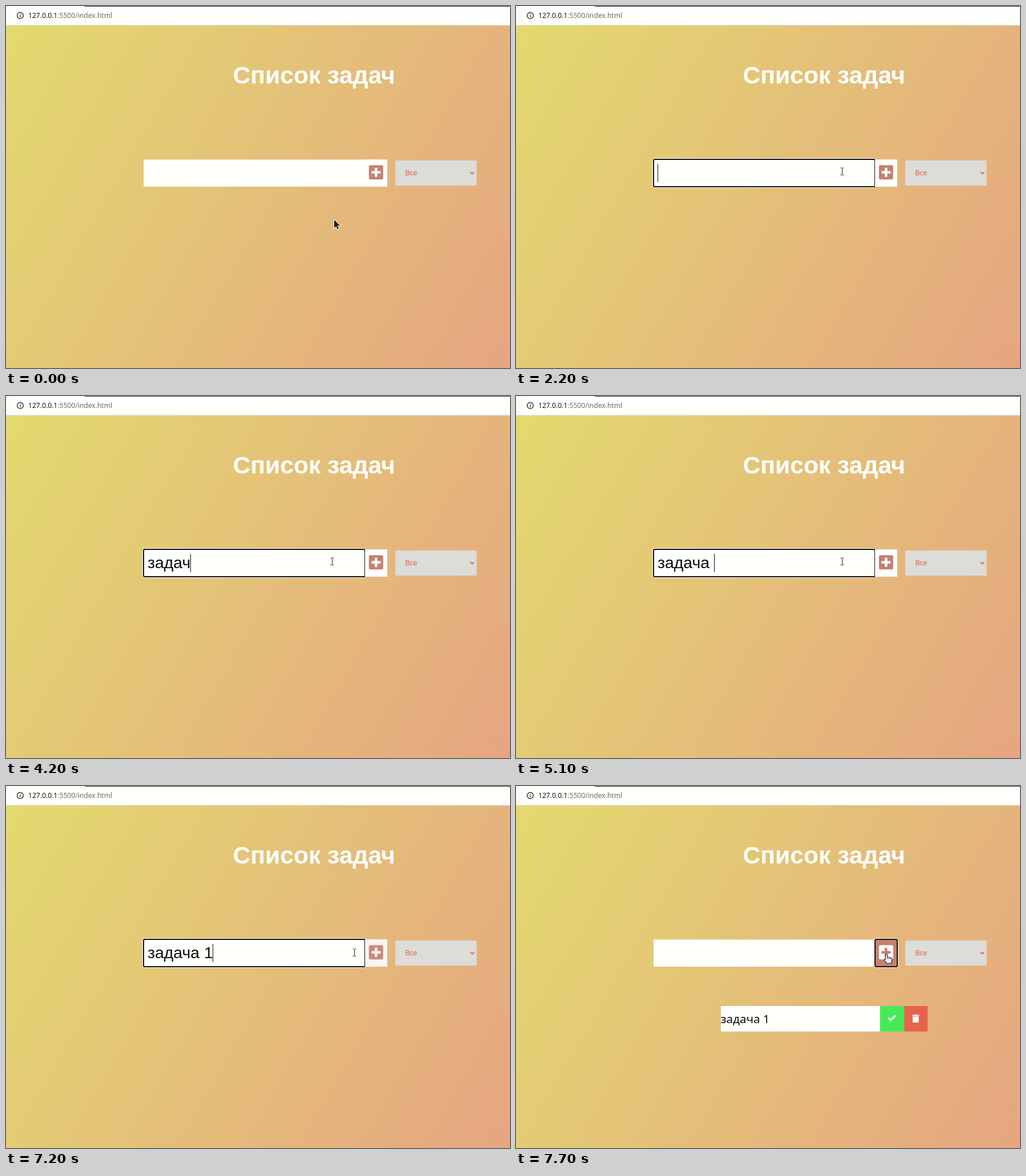
An HTML page with a canvas for the animation above (8 s loop, 883 by 635 pixels).

```html
<!DOCTYPE html>
<html lang="ru">
<head>
<meta charset="utf-8">
<title>Список задач</title>
<style>
  html, body { margin: 0; width: 100%; height: 100%; overflow: hidden; }
  canvas { display: block; }
</style>
</head>
<body>
<canvas id="stage" width="883" height="635"></canvas>
<script>
const ctx = document.getElementById('stage').getContext('2d');
const LOOP = 8000, STEP = 100;
const WHITE = '#fffffc', ROSE = [197, 128, 112], RED = '#e5644b', INK = '#0c0c0c';
const ARIAL = '"Liberation Sans", Arial, sans-serif';
const NOTO = '"Noto Sans", "Open Sans", sans-serif';
const TASK = 'задача 1';

// [time, letters typed]
const TYPING = [[3400, 1], [3500, 2], [3900, 4], [4200, 5], [5000, 6], [5100, 7], [6100, 8]];
const CARET_ON = [[1100, 1600], [2200, 3000], [3400, 4800], [5000, 5700], [6100, 6600], [7100, 7600]];
const FOCUS = 1100, PRESS = 7600, ADDED = 7700;

const clamp = v => Math.min(1, Math.max(0, v));
const smooth = v => { v = clamp(v); return v * v * (3 - 2 * v); };
const lerp = (a, b, u) => a + (b - a) * u;
const within = (t, [from, to]) => t >= from && t < to;
const blend = (a, b, u) => `rgb(${a.map((v, i) => Math.round(lerp(v, b[i], u))).join(',')})`;

function rect(x, y, w, h, color) {
  ctx.fillStyle = color;
  ctx.fillRect(x, y, w, h);
}

function round(x, y, w, h, r, color) {
  ctx.beginPath();
  ctx.roundRect(x, y, w, h, r);
  ctx.fillStyle = color;
  ctx.fill();
}

function line(points, color, width, closed) {
  ctx.beginPath();
  points.forEach(([x, y]) => ctx.lineTo(x, y));
  if (closed) ctx.closePath();
  ctx.strokeStyle = color;
  ctx.lineWidth = width;
  ctx.stroke();
}

function text(str, x, y, font, color) {
  ctx.font = font;
  ctx.fillStyle = color;
  ctx.fillText(str, x, y);
  return ctx.measureText(str).width;
}

function focusRing(x, y, w, h) {
  ctx.beginPath();
  ctx.roundRect(x - 1.5, y - 1.5, w + 3, h + 3, 4);
  ctx.strokeStyle = WHITE;
  ctx.lineWidth = 1;
  ctx.stroke();
  ctx.beginPath();
  ctx.roundRect(x, y, w, h, 2.5);
  ctx.strokeStyle = '#101010';
  ctx.lineWidth = 2;
  ctx.stroke();
}

function drawPage() {
  const gradient = ctx.createLinearGradient(0, 0, 937, 541);
  gradient.addColorStop(0, 'rgb(227,219,110)');
  gradient.addColorStop(0.5, 'rgb(228,191,121)');
  gradient.addColorStop(1, 'rgb(230,165,129)');
  rect(0, 0, 883, 635, gradient);

  rect(0, 0, 883, 34, '#fbfbf8');
  round(9, 4, 900, 26, 13, WHITE);
  rect(138, 0, 745, 1, '#2e2d2a');
  rect(0, 33.5, 883, 1, '#d8d5c8');

  ctx.beginPath();
  ctx.arc(25, 16.7, 5.4, 0, 7);
  ctx.strokeStyle = '#2f2f2f';
  ctx.lineWidth = 1.4;
  ctx.stroke();
  rect(24.3, 13.6, 1.4, 1.5, '#2f2f2f');
  rect(24.3, 16, 1.4, 3.6, '#2f2f2f');
  const url = `12.1px ${NOTO}`;
  const host = text('127.0.0.1', 39, 21, url, '#111');
  text(':5500/index.html', 39 + host, 21, url, '#6a6a68');

  ctx.textAlign = 'center';
  text('Список задач', 539.7, 135.5, `bold 42.6px ${ARIAL}`, WHITE);
  ctx.textAlign = 'left';

  rect(682, 271, 142.5, 44, '#dcdcd8');
  text('Все', 699.5, 297, `12px ${ARIAL}`, '#df604a');
  line([[813.5, 291], [817, 294.7], [820.5, 291]], '#df604a', 1.8);
}

function drawInput(t) {
  rect(241, 269.4, 427, 47.4, WHITE);
  if (within(t, [FOCUS, PRESS])) focusRing(241, 269, 388, 48);
  if (t >= ADDED) return;
  const typed = TYPING.filter(([time]) => t >= time).length;
  const value = typed ? TASK.slice(0, TYPING[typed - 1][1]) : '';
  const width = text(value, 248, 302, `28.4px ${ARIAL}`, INK);
  if (CARET_ON.some(span => within(t, span))) {
    rect(248 + Math.floor(width), 277, 1, 32, INK);
  }
}

function drawAddButton(t) {
  const hover = clamp((t - 7180) / 250);
  const light = [255, 255, 252];
  const back = blend(light, ROSE, hover), front = blend(ROSE, light, hover);
  rect(629, 269.4, 39, 47.4, back);
  if (t >= PRESS) focusRing(629, 269, 39, 48);
  round(635.8, 279.2, 25, 25, 2.7, front);
  round(640.3, 289.5, 16, 4.5, 0.7, back);
  round(646, 283.7, 4.5, 16, 0.7, back);
}

function drawTask() {
  rect(359, 386, 279, 44.6, WHITE);
  text(TASK, 358.5, 416, `20.5px ${NOTO}`, INK);
  rect(637.6, 386, 42.6, 44.6, '#48e959');
  line([[652.2, 406.8], [656.5, 411], [665, 402.6]], WHITE, 2.9);
  rect(680.2, 386, 41, 44.6, RED);
  rect(694, 401.6, 12.4, 1.8, WHITE);
  rect(698, 400.6, 4.4, 1.2, WHITE);
  round(694.9, 404.3, 10.6, 10.7, [0, 0, 1.4, 1.4], WHITE);
}

function drawArrow() {
  const shape = [[0, 0], [0, 14.5], [3.4, 11.3], [5.7, 16.6], [7.8, 15.7], [5.6, 10.6], [10, 10.2]];
  line(shape, '#f4f1e6', 2, true);
  ctx.fillStyle = '#1b1b1b';
  ctx.fill();
}

function drawBeam() {
  const ink = '#222';
  rect(0, -5.5, 1, 11.5, ink);
  for (const y of [-6.5, 6]) {
    rect(-2.5, y, 2.4, 1, ink);
    rect(1, y, 2.4, 1, ink);
  }
}

function drawHand() {
  ctx.beginPath();
  ctx.moveTo(-1.6, 8.5);
  ctx.lineTo(-1.6, 1);
  ctx.quadraticCurveTo(0, -1, 1.5, 1);
  ctx.lineTo(1.5, 5.6);
  ctx.quadraticCurveTo(3.2, 4.6, 4.4, 6.2);
  ctx.quadraticCurveTo(6.2, 5.4, 7.2, 7);
  ctx.quadraticCurveTo(9.6, 6.4, 9.8, 8.6);
  ctx.lineTo(9.4, 12.5);
  ctx.lineTo(8.2, 16);
  ctx.lineTo(0.6, 16);
  ctx.lineTo(-3.8, 10.4);
  ctx.quadraticCurveTo(-4.6, 8, -1.6, 9);
  ctx.closePath();
  ctx.fillStyle = '#fff';
  ctx.fill();
  ctx.strokeStyle = '#262626';
  ctx.lineWidth = 1.2;
  ctx.lineJoin = 'round';
  ctx.stroke();
  line([[1.5, 5.6], [1.5, 9]], '#262626', 0.8);
  line([[4.4, 6.4], [4.4, 9.2]], '#262626', 0.8);
  line([[7.2, 7.2], [7.2, 9.4]], '#262626', 0.8);
}

function drawPointer(t) {
  const rise = smooth((t - 300) / 500), slide = smooth((t - 7000) / 400);
  const x = lerp(lerp(575, 571, rise), 649, slide);
  const y = lerp(lerp(375, 290, rise), 294.5, slide);
  const away = within(t, [2600, 2800]);
  ctx.save();
  ctx.translate(Math.round(x), Math.round(y));
  if (x > 629) drawHand();
  else if (y > 317 || away) drawArrow();
  else drawBeam();
  ctx.restore();
}

function draw(t) {
  drawPage();
  drawInput(t);
  drawAddButton(t);
  if (t >= ADDED) drawTask();
  drawPointer(t);
}

const start = performance.now();
function tick() {
  const elapsed = (performance.now() - start) % LOOP;
  draw(Math.floor(elapsed / STEP) * STEP);
  requestAnimationFrame(tick);
}
tick();
</script>
</body>
</html>
```
